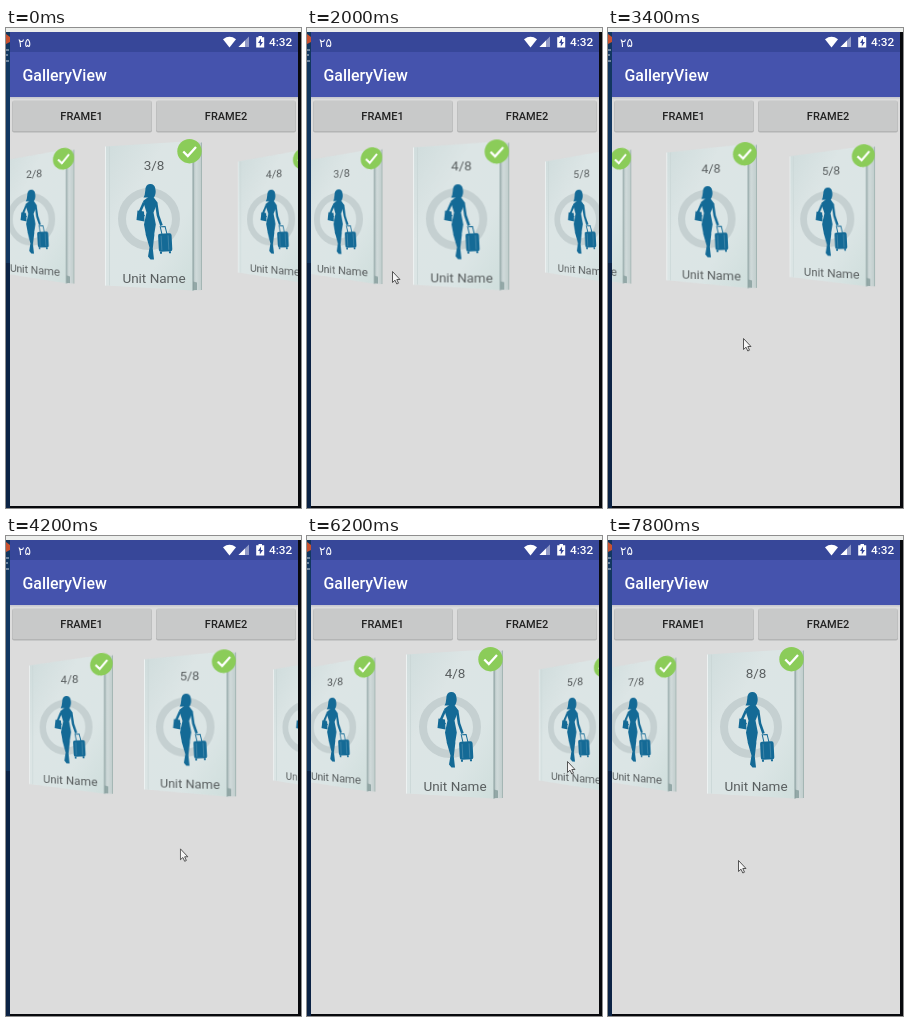
These frames come from a looping animation (295x480 px, 8 s). An HTML page:

```html
<!DOCTYPE html>
<html lang="en">
<head>
<meta charset="utf-8">
<title>Book carousel</title>
<style>
  html, body { margin: 0; width: 100%; height: 100%; overflow: hidden; background: #08090d; }
  body { position: relative; }
  svg { position: absolute; display: block; }
  text { font-family: Roboto, sans-serif; }
  #screen, #cursor { left: 0; top: 0; }
  #gallery { position: absolute; left: 4px; top: 104px; width: 288px; height: 374px; overflow: hidden; }
  .card { left: 84px; top: -1.5px; }
</style>
</head>
<body>
<svg id="screen" width="295" height="480">
  <!-- desktop edge -->
  <rect width="295" height="4" fill="#eceeec"/>
  <rect y="4" width="4" height="476" fill="#123760"/>
  <rect y="235" width="4" height="245" fill="#0c2345"/>
  <path d="M0 6L4 9V14L0 16Z" fill="#c9512f"/>
  <path d="M0 22h3M0 27h2M0 33h3" stroke="#c9d3df"/>
  <!-- app -->
  <rect x="4" y="4" width="288" height="474" fill="#dcdcdc"/>
  <rect x="4" y="4" width="288" height="21" fill="#374799"/>
  <rect x="4" y="24" width="288" height="45" fill="#4553ad"/>
  <rect x="4" y="69" width="288" height="1.5" fill="#c8c9d0"/>
  <g fill="#fff">
    <text x="12" y="19" font-size="12" style="font-family:'DejaVu Sans',sans-serif">۲۵</text>
    <path d="M217 11.2Q223.5 6.5 230 11.2L223.5 19.5Z"/>
    <path d="M243 8.5V19H232.5Z" opacity=".45"/>
    <path d="M239 12.5V19H232.5Z"/>
    <path d="M252.5 8h3.500v1.300h2.200V19.500h-8V9.300h2.300Z"/>
    <path d="M255 10.5L252 15h1.800v3.500L257 14h-2Z" fill="#374799"/>
    <text x="263" y="18.2" font-size="11.8" font-weight="500">4:32</text>
    <text x="16.5" y="52.8" font-size="15.9" font-weight="500">GalleryView</text>
  </g>
  <g font-size="11" font-weight="500" text-anchor="middle">
    <g fill="#b4b5b5">
      <rect x="6" y="73" width="140" height="31.5" rx="2"/>
      <rect x="150" y="73" width="140" height="31.5" rx="2"/>
    </g>
    <g fill="#c8c9c9">
      <rect x="6.5" y="72.5" width="139" height="30.5" rx="1.5"/>
      <rect x="150.5" y="72.5" width="139" height="30.5" rx="1.5"/>
    </g>
    <g fill="#222">
      <text x="75.5" y="92.3">FRAME1</text>
      <text x="220" y="92.3">FRAME2</text>
    </g>
  </g>
  <defs>
    <linearGradient id="cover" x2="1" y2="1">
      <stop offset="0" stop-color="#cfdcdc"/>
      <stop offset=".35" stop-color="#dce5e5"/>
      <stop offset=".7" stop-color="#dbe5e5"/>
      <stop offset="1" stop-color="#cfdedc"/>
    </linearGradient>
    <linearGradient id="pages">
      <stop offset="0" stop-color="#a5b6b6"/>
      <stop offset=".4" stop-color="#d0dada"/>
      <stop offset="1" stop-color="#bfcccb"/>
    </linearGradient>
    <g id="traveller" fill="#146a96">
      <path d="M144.5 155.500Q139.500 155 139.300 162Q139 167 137.500 169H148Q150.500 165 149.300 160Q148.500 155.600 144.500 155.500Z"/>
      <path d="M143 168L137 172.500L140.500 184L138 196L140 207H148L149.800 196L147.500 184L151.500 174L147 168Z"/>
      <path d="M139.7 206L143.500 219L142 228L144.500 231H148L146.800 220L148.400 206Z"/>
      <path d="M131.500 182L138 183L138.500 193L130.500 191.500Z"/>
      <path d="M138 174L134 183L138 188M150.200 174.500L152 187L155.500 197" fill="none" stroke="#146a96" stroke-width="2.6"/>
      <g transform="rotate(-3 159 215)">
        <path d="M155 197.500L156.500 206M156 198H160L161.500 206" fill="none" stroke="#146a96"/>
        <rect x="152.500" y="205" width="13.500" height="18" rx="2"/>
        <path d="M153.500 224h2M162.500 224h2" stroke="#146a96" stroke-width="2"/>
        <path d="M155.500 207V221.500M162.500 207V221.500" stroke="#5b96b3" stroke-width=".6"/>
      </g>
    </g>
    <g id="book">
      <path d="M186 113L196 114.500V261.500L186 262Z" fill="url(#pages)"/>
      <path d="M187 253L191 254V261.500H187Z" fill="#93a8a7"/>
      <path d="M195.500 114V261.500" stroke="#a4b6b4"/>
      <path d="M99 118L187 112.500V262L99 257Z" fill="url(#cover)"/>
      <path d="M99.500 118V257" stroke="#edf2f2"/>
      <path d="M103.500 118V257" stroke="#c9d6d6" stroke-width=".8"/>
      <path d="M187 113V262" stroke="#849999" stroke-width=".9"/>
      <circle cx="143" cy="190.500" r="27" fill="none" stroke="#c5d0d1" stroke-width="8"/>
      <use href="#traveller"/>
      <circle cx="183.500" cy="122.700" r="12.200" fill="#8bcc59"/>
      <path d="M177.300 123L181.800 127.500L190 118.500" fill="none" stroke="#fff" stroke-width="2.300"/>
    </g>
  </defs>
</svg>
<div id="gallery"></div>
<svg id="cursor" width="12" height="16">
  <path d="M.5 .5V11.500L3 9.200L4.800 13L6.500 12.200L4.800 8.500H8Z" fill="#f5f5f5" stroke="#444" stroke-width=".9"/>
</svg>
<script>
const LOOP = 8000, STEP = 200, SPACING = 120, COUNT = 8, FIRST = 3;

const swipes = [
  { start: 1200, length: 1050, by: 1 },
  { start: 3000, length: 880, by: 1 },
  { start: 3900, length: 900, by: -2 },
  { start: 5000, length: 900, by: 1 },
  { start: 6200, length: 600, by: 1 },
  { start: 6800, length: 1000, by: 3 }
];

const pointerStops = [
  { at: 0, x: 300, y: 228 },
  { at: 1200, x: 181, y: 235 },
  { at: 2000, x: 85, y: 243 },
  { at: 3400, x: 135, y: 310 },
  { at: 4800, x: 203, y: 314 },
  { at: 6200, x: 260, y: 225 },
  { at: 6800, x: 216, y: 313 },
  { at: 7800, x: 130, y: 324 }
];

const clamp = value => Math.min(Math.max(value, 0), 1);
const ease = p => p < 0.5 ? 4 * p ** 3 : 1 - 4 * (1 - p) ** 3;

const centredCard = time => swipes.reduce(
  (sum, { start, length, by }) => sum + by * ease(clamp((time - start) / length)), FIRST);

function pointerAt(time) {
  const i = pointerStops.findLastIndex(stop => stop.at <= time);
  const from = pointerStops[i], to = pointerStops[i + 1] || from;
  const mix = (time - from.at) / (to.at - from.at || 1);
  return { x: from.x + (to.x - from.x) * mix, y: from.y + (to.y - from.y) * mix };
}

const gallery = document.getElementById('gallery');
const cursor = document.getElementById('cursor');

gallery.innerHTML = Array.from({ length: COUNT }, (_, i) => `
  <svg class="card" width="120" height="180" viewBox="88 102.5 120 180" overflow="visible">
    <use href="#book"/>
    <g font-size="13.5" fill="#5a5f60" text-anchor="middle">
      <text x="148" y="141.500">${i + 1}/${COUNT}</text>
      <text x="148" y="254.500">Unit Name</text>
    </g>
  </svg>`).join('');
const cards = [...gallery.children];

function draw() {
  const time = Math.floor(performance.now() % LOOP / STEP) * STEP;
  const centre = centredCard(time);
  const { x, y } = pointerAt(time);

  cards.forEach((card, i) => {
    const offset = i + 1 - centre;
    const away = clamp(Math.abs(offset));
    card.style.display = Math.abs(offset) < 2 ? '' : 'none';
    card.style.transform = `translateX(${offset * SPACING}px) perspective(240px)` +
      ` rotateY(${-22 * away}deg) scale(${1 - 0.15 * away})`;
  });
  cursor.style.transform = `translate(${x}px, ${y}px)`;
  requestAnimationFrame(draw);
}

draw();
</script>
</body>
</html>
```
